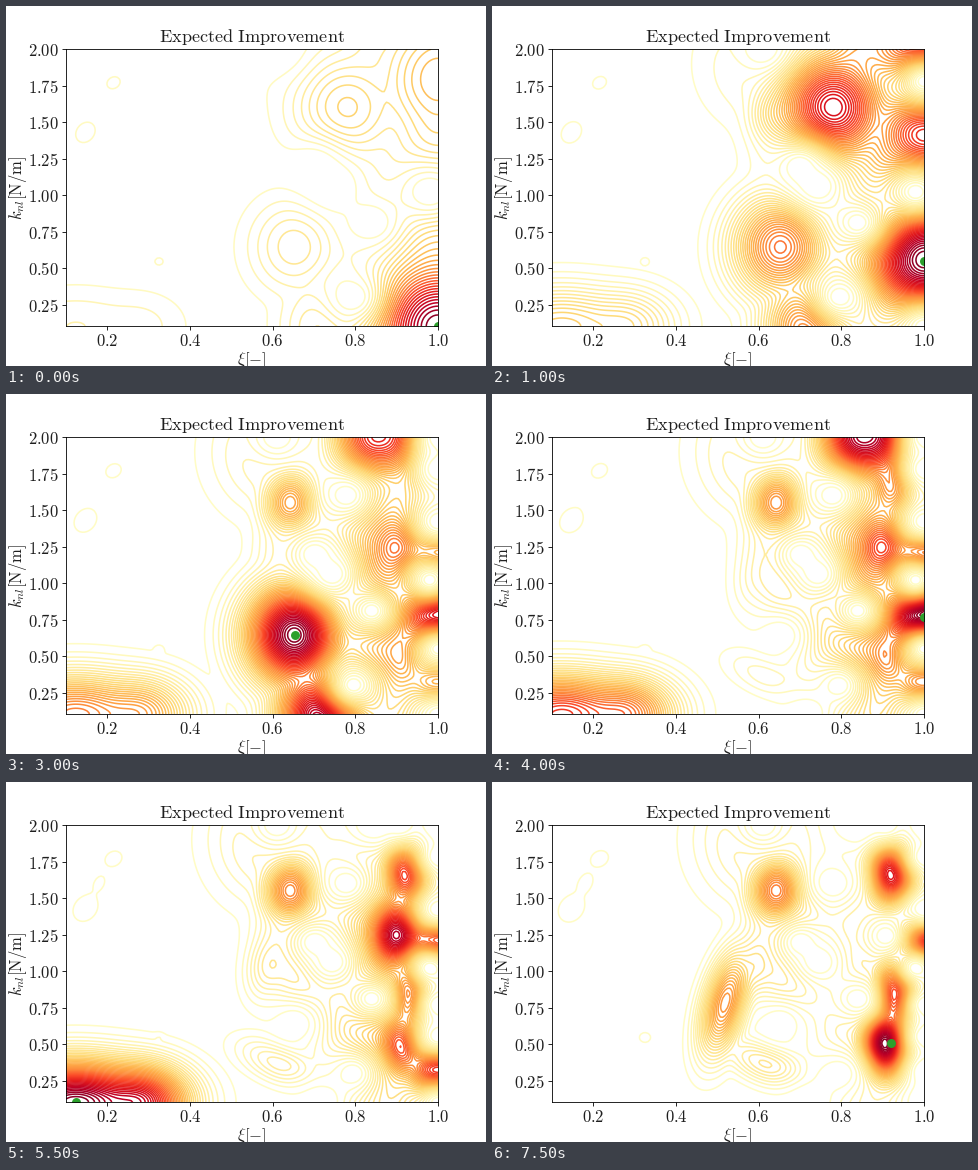
Recreate the animation shown at these times as a matplotlib script. Size 480 px wide and 360 px high, loop 8000 ms.

```python
import numpy as np
import matplotlib.pyplot as plt
from matplotlib.animation import FuncAnimation

FRAMES, STEP = 16, 500
INK = "0.12"
plt.rcParams.update({"mathtext.fontset": "cm", "text.color": INK, "axes.labelcolor": INK,
                     "xtick.labelcolor": INK, "ytick.labelcolor": INK})

X, Y = np.meshgrid(np.linspace(0.1, 1, 160), np.linspace(0.1, 2, 160))

# Points known at the start, then the best candidate of every step.
START = [(.70, 1.2), (.745, 1.06), (.84, .81), (.795, .3), (.98, 1.02), (.61, 2.0)]
BEST = [(1, .1), (1, 1.78), (1, .55), (.78, 1.6),
        (1, 1.42), (1, 2), (.653, .645), (.72, .1),
        (1, .77), (.84, 2), (.91, 2), (.123, .1),
        (.91, 1.24), (.28, .1), (1, .32), (.921, .51)]

# Hills that grow but are not sampled: x, y, width, height, slant, level, first step.
SLOW = [(.645, 1.55, .045, .15, 0, .55, 0), (.93, 1.72, .04, .2, 0, .85, 5),
        (.94, .85, .035, .17, 0, .75, 7), (.595, 1.05, .04, .18, .05, .22, 6),
        (.52, .78, .037, .24, .08, .75, 11), (.62, .37, .06, .12, -.3, .2, 6),
        (1, 1.2, .05, .12, 0, .7, 3), (.68, 1.2, .07, .35, 0, .2, 0),
        (.6, 1.9, .1, .3, 0, .12, -1), (.18, 1.6, .025, .1, .1, .03, 4)]
ISLETS = [(.147, 1.43, .028, .085, .07), (.215, 1.77, .019, .05, .07),
          (.325, .545, .012, .03, 0)]


def hill(x, y, w, h, slant=0):
    dx, dy = X - x - slant * (Y - y), Y - y
    return np.exp(-(dx / w) ** 2 / 2 - (dy / h) ** 2 / 2)


def level_count(n):
    return 46 if n else 30


def improvement(n):
    """Hills between the sampled points, scaled so that the best one is 1."""
    free = np.ones_like(X)
    for x, y in START + BEST[:n]:
        free *= 1 - hill(x, y, .05, .125)

    total = np.zeros_like(X)

    def add(shape, height):
        shape = shape * free
        total[:] += (height * shape / shape.max()) ** 3

    # Each candidate rises until it is sampled; later ones are narrower.
    fade = 1 - .6 * np.exp(-n)
    for k, (x, y) in enumerate(BEST[n:], n):
        w = .11 * .94 ** k * (1 + 2.5 * (1 - x) ** 4)
        rise = np.exp((n - k) / 8) * (fade if k > n else 1)
        add(hill(x, y, w, .3 * .96 ** k), rise)

    for *shape, height, first in SLOW:
        add(hill(*shape), height * (1 - np.exp(-max(n - first, 0) / 4)))
    for islet in ISLETS:
        add(hill(*islet), (1.4 + .03 * n) / level_count(n))
    add(hill(.89, .9, .11, .7), .1 + .35 * np.sin(np.pi * n / FRAMES))

    value = np.cbrt(total)
    return value / value.max()


fig, ax = plt.subplots(figsize=(6.4, 4.8), dpi=75)
ax.set(xlim=(.1, 1), ylim=(.1, 2))
ax.set_title(r"$\mathrm{Expected\ Improvement}$", fontsize=17.5, pad=6.5)
ax.set_xlabel(r"$\xi[-]$", fontsize=16, labelpad=.3)
ax.set_ylabel(r"$k_{nl}[\mathrm{N/m}]$", fontsize=16, labelpad=-1.5)
xticks, yticks = np.arange(.2, 1.01, .2), np.arange(.25, 2.01, .25)
ax.set_xticks(xticks, [f"${t:.1f}$" for t in xticks], fontsize=16)
ax.set_yticks(yticks, [f"${t:.2f}$" for t in yticks], fontsize=16)
ax.tick_params(axis="x", pad=1.7)
dot, = ax.plot([], [], "o", color="tab:green", ms=8.6, mew=0, zorder=2.4)


def update(n):
    for old in list(ax.collections):
        old.remove()
    count = level_count(n)
    ax.contour(X, Y, improvement(n), levels=np.arange(1, count) / count,
               cmap="YlOrRd", vmin=0, vmax=1, linewidths=1.5)
    dot.set_data([BEST[n][0]], [BEST[n][1]])
    return [dot]


anim = FuncAnimation(fig, update, frames=FRAMES, init_func=lambda: [dot],
                     interval=STEP, repeat=True, repeat_delay=0, blit=False)
plt.show()
```
